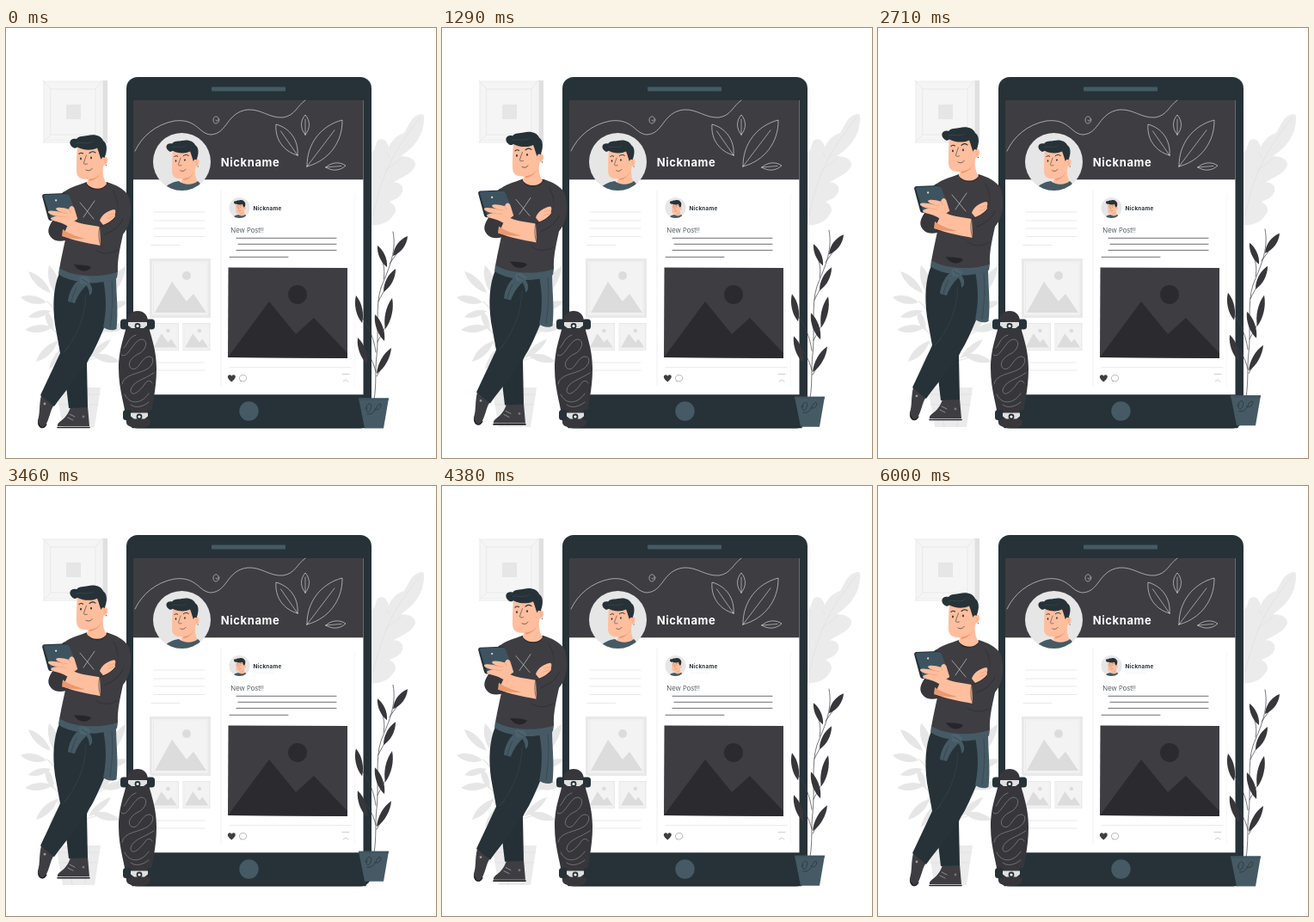
An HTML page with a canvas that plays this animation: 500x500 px, repeating every 6.04 s.

```html
<!DOCTYPE html>
<html lang="en">
<head>
<meta charset="utf-8">
<title>New post</title>
<style>
html, body { margin: 0; width: 100%; height: 100%; overflow: hidden; background: #fff; }
canvas { display: block; width: 500px; height: 500px; }
</style>
</head>
<body>
<canvas id="stage"></canvas>
<script>
const canvas = document.getElementById('stage');
const ctx = canvas.getContext('2d');
const ratio = window.devicePixelRatio || 1;
canvas.width = canvas.height = 500 * ratio;

const LOOP = 6040;
const NAVY = '#263238', SLATE = '#455a64', DARK = '#3e3d42', INK = '#2b2b2f';
const SKIN = '#ffbe9d', BLUSH = '#eb996e', PALE = '#e6e6e6', FAINT = '#f5f5f5';

function fill(d, color) {
  ctx.fillStyle = color;
  ctx.fill(new Path2D(d));
}

function line(d, color, width = 0.7) {
  ctx.strokeStyle = color;
  ctx.lineWidth = width;
  ctx.stroke(new Path2D(d));
}

function rect(x, y, w, h, color, r = 0) {
  ctx.fillStyle = color;
  ctx.beginPath();
  ctx.roundRect(x, y, w, h, r);
  ctx.fill();
}

function dot(x, y, rx, color, ry = rx, turn = 0) {
  ctx.fillStyle = color;
  ctx.beginPath();
  ctx.ellipse(x, y, rx, ry, turn, 0, Math.PI * 2);
  ctx.fill();
}

function text(str, x, y, font, color, spacing = '0px') {
  ctx.font = font + ' Inter, "Open Sans", sans-serif';
  ctx.letterSpacing = spacing;
  ctx.fillStyle = color;
  ctx.fillText(str, x, y);
}

function shifted(x, y, scale, draw) {
  ctx.save();
  ctx.translate(x, y);
  ctx.scale(scale, scale);
  draw();
  ctx.restore();
}

// Almond shape from base to tip
function leafPath(x1, y1, x2, y2, w) {
  const dx = x2 - x1, dy = y2 - y1, len = Math.hypot(dx, dy);
  const nx = -dy / len * w, ny = dx / len * w;
  const side = (s, k) => `${x1 + dx * k + nx * s} ${y1 + dy * k + ny * s}`;
  return `M${x1} ${y1}C${side(1, .3)} ${side(1, .7)} ${x2} ${y2}` +
         `C${side(-1, .7)} ${side(-1, .3)} ${x1} ${y1}Z`;
}

function drawWall() {
  rect(43, 61, 75, 72.5, '#e0e0e0');
  rect(43, 61, 69.5, 72.5, FAINT);
  line('M52 71H104V124H52ZM43 61L52 71M112 61L104 71M43 133L52 124M112 133L104 124', PALE, .8);
  line('M45 63H110V131H45Z', '#ececec', .6);
  rect(70, 89, 17, 17, PALE);
}

function drawPaleFern() {
  line('M84 420C80 380 72 340 48 318M84 420C88 380 100 330 128 300M76 370L50 346M80 395L58 364M94 362L130 346M89 388L118 380', PALE, 1.1);
  const leaves = [
    [47, 319, 17, 313, 6], [52, 308, 26, 283, 6], [61, 312, 50, 276, 7],
    [52, 329, 26, 336, 5], [54, 348, 22, 351, 6], [55, 352, 46, 328, 5],
    [60, 364, 35, 388, 6], [66, 371, 50, 397, 4], [116, 315, 139, 277, 7],
    [110, 328, 142, 318, 6], [112, 352, 141, 345, 6], [105, 356, 128, 330, 5],
    [100, 380, 132, 388, 6], [96, 384, 122, 362, 5]
  ];
  for (const l of leaves) fill(leafPath(...l), PALE);
  fill('M58 418H110L103 464H66Z', '#ebebeb');
  line('M59 426H109M61 438H107M72 418L77 464M96 418L92 464', '#dcdcdc', .6);
}

function drawPaleLeaf() {
  fill('M484 100C488 101 486 110 484 119C479 134 468 143 459 149C468 149 477 153 476 159C474 169 460 173 450 180C457 178 463 184 461 190C458 198 452 199 446 202C451 205 455 210 452 215C447 225 437 230 424 229V145C429 145 429 135 432 131C439 126 444 133 445 139C448 131 455 124 463 122C468 115 471 101 484 100Z', '#ebebeb');
  line('M482 104C460 132 439 158 427 218M443 145L446 150M459 152L441 166', '#dedede', .6);
}

function placeholder(x, y, w, h) {
  rect(x, y, w, h, '#e9e9e9');
  const k = w / 71;
  ctx.strokeStyle = '#fff';
  ctx.lineWidth = .6;
  ctx.strokeRect(x + 4 * k, y + 4 * k, w - 8 * k, h - 8 * k);
  rect(x + 5 * k, y + 5 * k, w - 10 * k, h - 10 * k, '#f3f3f3');
  dot(x + 43 * k, y + 20 * k, 5 * k, '#dcdcdc');
  shifted(x, y, k, () => fill('M6 63L26 27L43 50L51 41L66 63Z', '#dcdcdc'));
}

function drawHead() {
  fill('M95 164L113 157C112 168 113 177 118 182C113 189 99 189 93 182C96 178 96 171 95 164Z', SKIN);
  fill('M97 175C104 174 109 170 112 164C111 170 105 177 97 178Z', BLUSH);
  dot(114.5, 154.5, 3.6, SKIN, 5, .2);
  fill('M83 137C82 147 82 158 82 167C82.5 174 88 176.5 95 176C105 175.5 112 171 114 158L111 134Z', SKIN);
  fill('M78 139C71 134 75 127 82 129C85 125 91 126 95 125C104 123 111 126 113 131C118 134 118 143 114.5 151C112.5 149 111 151 110.5 153C109 149 108 144 106 139.5C99 143 89 142 83 138.5C81 140 79.5 140 78 139Z', NAVY);
  line('M82 134C88 132 95 136 101 132', '#46555c', .5);
  line('M85 146.5C86 145 88 145 89.5 146M97 145.5C99 143.5 102 143.5 104 145', NAVY, 1.1);
  dot(87, 152, .9, NAVY, 1.4);
  dot(99, 151, .9, NAVY, 1.4);
  line('M93.5 148C92 152 90.5 156 90.5 157.5C91 158.5 93 158.5 94.5 158', NAVY, .6);
  line('M93 165C95.5 166.5 98.5 166 100 163.5', NAVY, .7);
  line('M113.5 153C115.5 151.5 116.5 154 114.5 157', BLUSH, .6);
  dot(116.5, 159.5, .6, NAVY);
}

function drawAvatar() {
  ctx.save();
  dot(204.5, 155.5, 33.5, PALE);
  ctx.beginPath();
  ctx.arc(204.5, 155.5, 33.5, 0, Math.PI * 2);
  ctx.clip();
  shifted(121.8, 22.2, .87, drawHead);
  fill('M182 190C186 182 194 179 201 178C207 183 217 183 223 178C226 180 228 185 229 190Z', SLATE);
  ctx.restore();
}

function drawHeader() {
  rect(148, 84, 267.5, 92.3, DARK);
  line('M150 143C158 126 174 112 196 108C222 105 224 123 238 124C258 123 256 98 281 95C297 94 306 105 322 104C336 102 338 91 348 84', '#fff', .55);
  line('M248 106C248 112 241 113 241 107C241 102 246 102 247 105C247 109 244 109 244 107', '#fff', .5);
  const leaves = [[339, 148, 314, 112, 11], [348, 124, 348, 101, 6], [350, 161, 391, 107, 16], [372, 162, 395, 160, 5.5]];
  for (const l of leaves) {
    line(leafPath(...l), '#fff', .55);
    const [x, y, tx, ty] = l, k = .78;
    line(`M${x} ${y}L${x + (tx - x) * k} ${y + (ty - y) * k}`, '#fff', .5);
  }
  drawAvatar();
  text('Nickname', 249.7, 161, '700 13px', '#fff', '0.6px');
}

function drawSidebar() {
  line('M172 214H231M172 224H231M172 233H231M172 242.5H231M169 252.5H202M172 389H231M172 398H231', '#e0e0e0', .7);
  placeholder(167, 268, 71, 69);
  placeholder(169, 343, 32, 32);
  placeholder(205.5, 343, 32, 32);
}

function drawPost() {
  line('M250 189V416', '#ebebeb', .8);
  line('M405.5 193V416', '#f4f4f4', .7);
  shifted(271.5 - 204.5 * .36, 209 - 155.5 * .36, .36, drawAvatar);
  text('Nickname', 287.5, 212.2, '700 6.3px', NAVY, '0.25px');
  line('M288 217.5H312', '#f0f0f0', .6);
  text('New Post!!', 261.3, 237.8, '300 7.7px', NAVY);
  line('M268 244.3H384M270 251.3H384M268 258.4H384M260 266.3H328', DARK, .75);
  fill('M258.5 278.5L397 279L397 384L258 383Z', DARK);
  dot(339, 310, 11, INK);
  fill('M258 383L306 318L337 356L358 337L397 378V384Z', INK);
  line('M260 394.5H401', '#e4e4e4', .7);
  fill('M262.3 411.5C258 408 257 406 258.5 404C260 402.5 262 403.5 262.3 405C262.6 403.5 265 402.5 266.3 404C267.5 406 266.5 408 262.3 411.5Z', DARK);
  line('M273 410.5C270 408 271.5 403.5 275.5 403.5C279.5 403.5 281 407 278.5 410C277 411.5 275 411 273 410.5Z', '#888', .6);
  line('M391 402.5H399M392 411L395 409L398 411', '#bbb', .7);
}

function drawDevice() {
  rect(140, 57, 285, 408.5, NAVY, 13);
  line('M147 464.5H418', '#222c32', 1.6);
  rect(239, 68.5, 86, 5, SLATE, 1);
  rect(148, 84, 267.5, 342.3, '#fff');
  drawHeader();
  drawSidebar();
  drawPost();
  dot(282.5, 445.5, 11.2, SLATE);
}

function truck(y, left, right) {
  rect(left - 5, y - 6.5, 10, 12, NAVY, 3.5);
  rect(right - 5, y - 6.5, 10, 12, NAVY, 3.5);
  fill(`M${left + 4} ${y - 3}H${right - 4}V${y + 1}L${right - 8} ${y + 4}H${left + 8}L${left + 4} ${y + 1}Z`, '#e0e0e0');
  dot((left + right) / 2, y + 1.5, 3.4, NAVY);
  dot((left + right) / 2, y + 1.5, 1.6, '#fff');
}

function drawBoard() {
  fill('M153 329C160 329 164 333 165 340C166 354 175 370 175 396C175 422 169 440 168 459C167 467 141 467 140 459C139 440 131 422 131 396C131 370 140 354 141 340C142 333 146 329 153 329Z', '#37363b');
  line('M134 380C142 386 148 362 158 362C166 363 163 375 154 379C145 383 140 392 146 396C154 400 157 383 166 382C173 382 172 391 165 396C154 403 137 402 135 414', '#aaa', .5);
  line('M137 372C142 367 142 360 151 357M172 401C160 409 147 411 145 421C146 431 157 421 162 413C165 409 169 410 170 413M138 426C144 439 158 437 166 425M145 438C151 443 160 440 166 435', '#aaa', .5);
  truck(345, 138, 168);
  truck(450.5, 141, 169);
}

function drawLegs() {
  fill('M75 441L95 440L97 463H60C59 457 70 457 75 441Z', DARK);
  line('M60 464.5H97', '#1f1f23', 1.6);
  line('M72 453L78 456M74 449L80 452', '#ddd', .5);
  dot(90, 452, 1.4, '#777');
  fill('M62 320L66 382L73 442L95 441L94 390L110 350Z', '#243036');
  fill('M41 427L56 438C51 445 51 454 45 464C41 467 36 464 37 456C40 447 38 440 41 427Z', DARK);
  line('M38 460C40 466 44 466 47 461', '#1f1f23', 1.2);
  dot(45, 437, 1.4, '#999');
  fill('M62 285C55 302 54 322 57 345L63 378L40 427L56 440C70 420 93 396 106 367C119 339 127 318 127 289Z', NAVY);
  line('M93 310C92 335 84 356 68 376M66 378L73 371', '#3a4a52', .5);
}

function drawJacket() {
  fill('M112 288L128 287C128 310 131 328 128.5 350C123 353 116 350 113 348C118 325 116 306 112 288Z', SLATE);
  line('M123 294C125 315 123 332 121 347', NAVY, .4);
  fill('M62 279C76 289 108 291 130 284L129 290.5C114 297 98 297 91 296C78 294 67 291 61 286Z', SLATE);
  fill('M87 291C79 296 73 307 72 318L80 320C83 312 87 305 94 299Z', SLATE);
  fill('M90 295C95 300 97 305 97 311C101 309 102 302 96 295Z', SLATE);
  fill('M85 290C88 287 96 289 98 293C98 298 90 299 86 297Z', '#4c636e');
  line('M82 302C79 308 77 313 76 318M88 292L95 296', NAVY, .5);
}

function drawTorso() {
  fill('M94 179C83 183 72 186 66 192C71 204 72 216 73 228C69 246 65 263 62 280C82 292 113 291 130 284C129 267 134 251 137 235C145 223 146 206 143 196C138 187 127 182 117 179C111 188 99 188 94 179Z', DARK);
  line('M86 203L102 222M103 201L90 220', '#ddd', .6);
  fill('M79 275C87 276 93 275 99 278C95 285 84 284 79 275Z', '#26262a');
  line('M104 258C112 264 122 263 130 258M125 190C130 200 131 208 130 214', '#26262a', .5);
}

function drawArms() {
  fill('M68 190C61 193 62 206 57 220C51 228 46 236 52 243C57 249 66 249 75 245L79 228L72 205Z', '#38373c');
  fill('M109 224C111 217 119 212 126 211C129 213 126 216 127 219C124 224 119 227 113 229Z', SKIN);
  line('M119 217.5L126 215.5M118 221.5L126 219', BLUSH, .6);
  fill('M143 198C147 211 146 229 136 240C129 248 119 252 109 254L109 231C116 229 122 225 127 220C132 214 130 204 130 196Z', DARK);
  fill('M75 222C84 228 97 229 109 231L110 253C93 250 79 247 66 242Z', SKIN);
  fill('M66 234C76 241 86 243 92 245C82 246 72 244 65 242Z', BLUSH);
  line('M109 231C107 239 108 247 110 253M127 220C122 226 115 229 109 231M136 222C132 231 125 236 115 240', '#26262a', .6);
}

function drawTablet() {
  fill('M40 195L67 194Q70 194 71 197L79 217Q80 220 77 221L50 228Q46 229 45 225L38 199Q37 196 40 195Z', NAVY);
  fill('M42 196L68 195Q71 195 72 198L79 216Q80 219 77 220L52 226Q49 227 48 224L40 199Q39 196 42 196Z', '#3d5460');
  dot(55, 203, 1.2, '#dbe3e6');
  fill('M78 213C76 208 72 210 71 214C65 212 57 211 55 213C55 216 60 217 63 218C55 216 47 215 45 217C45 220 52 222 57 223C51 223 47 225 49 227C54 230 62 230 69 235L82 226Z', SKIN);
  line('M57 217C62 218 65 219 69 219M54 222C59 223 63 224 67 224M71 214L73 218', BLUSH, .6);
}

function drawMan() {
  drawLegs();
  drawTorso();
  drawJacket();
  drawHead();
  line('M93 181C99 189.5 113 189.5 118 181', '#2b2a2e', 1.4);
  drawArms();
  shifted(7, 11.7, .93, drawTablet);
}

function drawVine() {
  line('M428 432C431 414 429 397 431 381C434 354 429 324 436 302C443 284 455 262 450 237M430 400C427 387 422 379 414 370M430 377C428 360 421 347 414 336M431 405C435 398 439 392 441 388M432 365C436 357 440 350 442 346M433 318C437 310 440 305 443 300M439 292C441 283 439 275 437 269M446 274L454 263', DARK, .7);
  const leaves = [
    [450, 265, 467, 242, 5.5], [443, 278, 432, 253, 4.5], [439, 307, 453, 280, 5],
    [414, 343, 407, 311, 5], [441, 350, 449, 314, 5], [440, 364, 429, 333, 5],
    [420, 391, 409, 360, 5], [431, 402, 448, 372, 5]
  ];
  for (const l of leaves) fill(leafPath(...l), '#37363b');
  fill('M410 430.5H445L439 465.5H417Z', SLATE);
  fill('M410 430.5H445L444.5 433H410.5Z', '#405560');
  line('M418 443C420 434 427 436 424 443C422 449 417 446 420 441M420 449C430 451 430 437 435 437C438 441 431 446 429 443', NAVY, .7);
}

// Smooth rise and return
const lift = (t, period, height) => -height * (1 - Math.cos(t / period * Math.PI * 2)) / 2;

function frame(now) {
  const t = now % LOOP;
  ctx.setTransform(ratio, 0, 0, ratio, 0, 0);
  ctx.lineCap = ctx.lineJoin = 'round';
  ctx.fillStyle = '#fff';
  ctx.fillRect(0, 0, 500, 500);
  drawWall();
  drawPaleFern();
  drawPaleLeaf();
  drawDevice();
  shifted(0, lift(t, LOOP, 9.3), 1, drawMan);
  drawBoard();
  shifted(0, lift(t, LOOP / 4, 9), 1, drawVine);
  requestAnimationFrame(frame);
}
requestAnimationFrame(frame);
</script>
</body>
</html>
```
